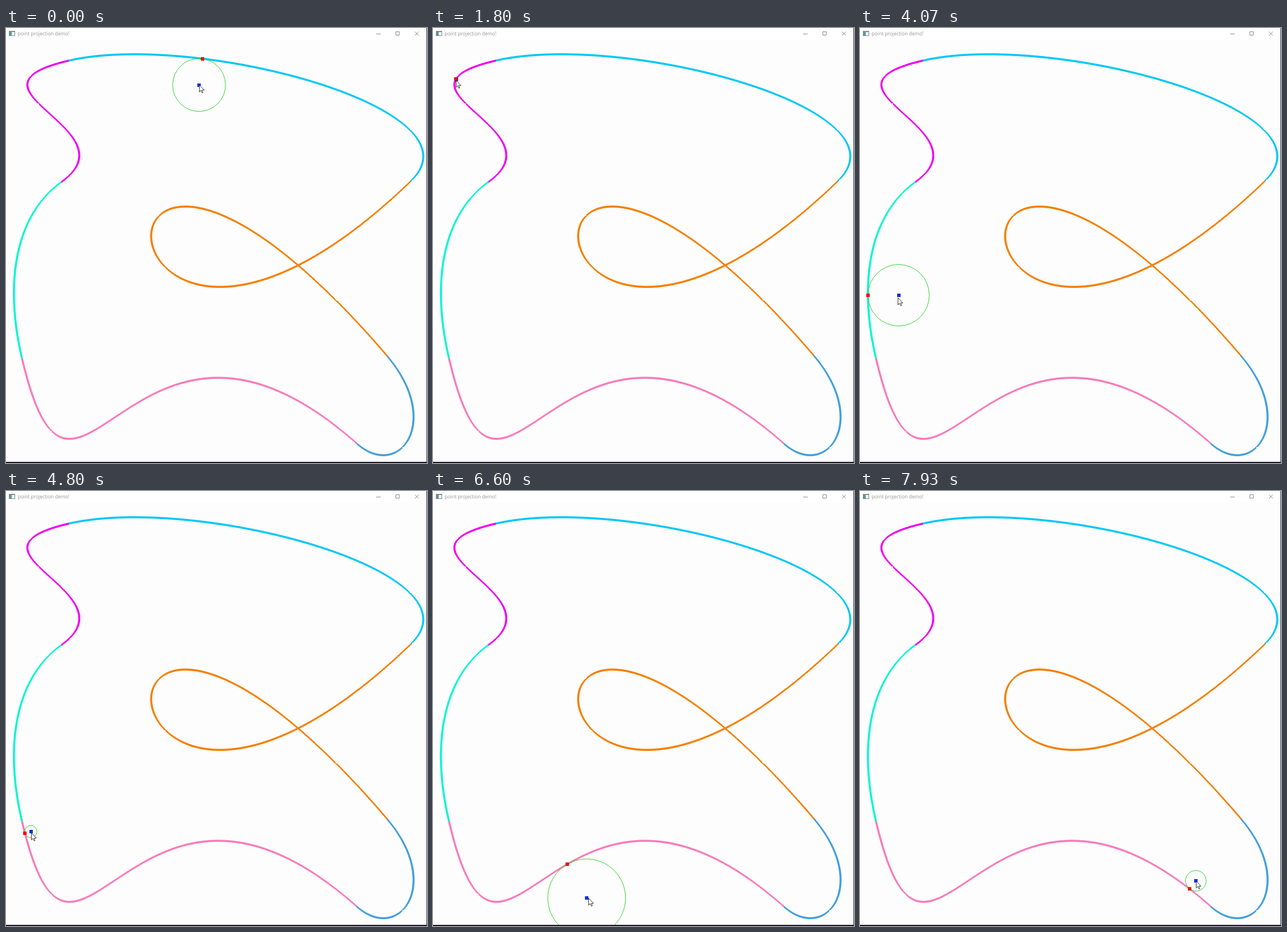
Write an HTML page with a canvas that moves like this. It is 737 px wide and 760 px high and loops after 8000 ms.

```html
<!DOCTYPE html>
<html lang="en">
<head>
<meta charset="utf-8">
<title>point projection demo!</title>
<style>
  html, body { margin: 0; width: 100%; height: 100%; overflow: hidden; background: #fdfdfd; }
  canvas { display: block; }
</style>
</head>
<body>
<canvas id="stage" width="737" height="760"></canvas>
<script>
const W = 737, H = 760, LOOP = 8000, STEPS_PER_MS = 0.015;
const LINE = 3.6, SAMPLES = 3000, CURSOR_LEAD = 15;

// Closed smooth outline. The incoming handle is the outgoing one, mirrored and scaled by `back`.
const node = (color, x, y, dx, dy, back) => ({ color, x, y, dx, dy, back });
const OUTLINE = [
  node('#05c8f5', 110, 57, 220, -51, 0.955),
  node('#f58000', 709, 267, -574, 552, 0.23),
  node('#46a0da', 667, 573, 98.5, 115, 5.9),
  node('#f87cba', 614, 726, -393, -348, 0.188),
  node('#0cf5d0', 28, 577, -31, -131, 3),
  node('#f000f0', 97, 269, 129, -92, 0.63),
];

// Key poses of the pointer.
const pose = (time, x, y) => ({ time, x, y });
const POSES = [
  pose(0, 338, 99.5), pose(1000, 169, 82), pose(1800, 41, 90),
  pose(2600, 93, 173), pose(3330, 148, 249), pose(4100, 65, 475),
  pose(4800, 43.5, 595), pose(5600, 115, 710), pose(6600, 269, 711),
  pose(7200, 425, 694), pose(7930, 588, 681),
];

const ctx = document.getElementById('stage').getContext('2d');

function cubic(a, b, c, d, t) {
  const u = 1 - t;
  return u * u * u * a + 3 * u * u * t * b + 3 * u * t * t * c + t * t * t * d;
}

const strokes = OUTLINE.map((from, i) => {
  const to = OUTLINE[(i + 1) % OUTLINE.length];
  const points = Array.from({ length: SAMPLES + 1 }, (_, k) => ({
    x: cubic(from.x, from.x + from.dx, to.x - to.dx * to.back, to.x, k / SAMPLES),
    y: cubic(from.y, from.y + from.dy, to.y - to.dy * to.back, to.y, k / SAMPLES),
  }));
  return { color: from.color, points };
});

// Thickness runs along the minor axis, one slice per pixel centre that the curve crosses.
function drawStroke(g, { color, points }) {
  g.fillStyle = color;
  for (let i = 1; i < points.length; i++) {
    const p = points[i], q = points[i - 1];
    const wide = Math.abs(p.x - q.x) > Math.abs(p.y - q.y);
    const axis = wide ? 'x' : 'y';
    const now = Math.floor(p[axis] - 0.5), before = Math.floor(q[axis] - 0.5);
    if (now === before) continue;
    const cell = Math.max(now, before);
    if (wide) g.fillRect(cell, p.y - LINE / 2, 1, LINE);
    else g.fillRect(p.x - LINE / 2, cell, LINE, 1);
  }
}

function fillBox(g, color, ...box) {
  g.fillStyle = color;
  g.fillRect(...box);
}

function drawTitleBar(g) {
  fillBox(g, '#fff', 0, 0, W, 20);
  fillBox(g, '#87908f', 5, 5, 11, 9);
  fillBox(g, '#eef1f1', 6, 7, 9, 6);
  fillBox(g, '#5b9a92', 6, 7, 4, 6);
  g.fillStyle = '#959595';
  g.font = '8.5px "Open Sans", "Noto Sans", sans-serif';
  g.fillText('point projection demo!', 20.5, 13);
  g.strokeStyle = '#8c8c8c';
  g.beginPath();
  g.moveTo(648, 10.5); g.lineTo(656, 10.5);
  g.rect(682.5, 6.5, 6, 6);
  g.moveTo(716, 6.5); g.lineTo(722.5, 13);
  g.moveTo(722.5, 6.5); g.lineTo(716, 13);
  g.stroke();
}

const backdrop = document.createElement('canvas');
backdrop.width = W;
backdrop.height = H;
const back = backdrop.getContext('2d');
fillBox(back, '#fdfdfd', 0, 0, W, H);
drawTitleBar(back);
strokes.forEach(stroke => drawStroke(back, stroke));

// The pointer starts and ends at rest.
function speed(i, axis) {
  const a = POSES[i - 1], b = POSES[i + 1];
  return a && b ? (b[axis] - a[axis]) / (b.time - a.time) : 0;
}

function pointerAt(time) {
  const found = POSES.findIndex(p => p.time > time);
  const i = (found < 0 ? POSES.length - 1 : found) - 1;
  const a = POSES[i], b = POSES[i + 1], span = b.time - a.time;
  const s = Math.min((time - a.time) / span, 1);
  const along = axis => cubic(
    a[axis], a[axis] + speed(i, axis) * span / 3,
    b[axis] - speed(i + 1, axis) * span / 3, b[axis], s);
  return { x: along('x'), y: along('y') };
}

function project({ x, y }) {
  let radius = Infinity, hit;
  for (const { points } of strokes) {
    for (const p of points) {
      const d = Math.hypot(p.x - x, p.y - y);
      if (d < radius) { radius = d; hit = p; }
    }
  }
  return { hit, radius };
}

function drawDot({ x, y }, color) {
  fillBox(ctx, color, Math.round(x - 3), Math.round(y - 3), 6, 6);
}

const arrow = new Path2D('M0 0V16.2L3.7 12.7L6.2 18.4L8.6 17.4L6.2 11.8H11.3Z');

function drawCursor({ x, y }) {
  ctx.save();
  ctx.translate(Math.round(x) + 0.5, Math.round(y) + 0.5);
  ctx.scale(0.75, 0.75);
  ctx.fillStyle = '#fff';
  ctx.fill(arrow);
  ctx.strokeStyle = '#222';
  ctx.lineWidth = 1.2;
  ctx.stroke(arrow);
  ctx.restore();
}

function draw(time) {
  const pointer = pointerAt(time);
  const { hit, radius } = project(pointer);
  ctx.drawImage(backdrop, 0, 0);
  ctx.strokeStyle = '#2fd42f';
  ctx.beginPath();
  ctx.arc(pointer.x, pointer.y, radius, 0, 2 * Math.PI);
  ctx.stroke();
  drawDot(pointer, '#1030e8');
  drawDot(hit, '#f00c10');
  drawCursor(pointerAt(time + CURSOR_LEAD));
  fillBox(ctx, '#1c1428', 0, 758, W, 2);
  fillBox(ctx, '#3a3a50', 736, 0, 1, H);
}

let start, shown = -1;
function tick(now) {
  start ??= now;
  const step = Math.floor(((now - start) % LOOP) * STEPS_PER_MS + 0.06);
  if (step !== shown) {
    shown = step;
    draw(step / STEPS_PER_MS % LOOP);
  }
  requestAnimationFrame(tick);
}
draw(0);
requestAnimationFrame(tick);
</script>
</body>
</html>
```
